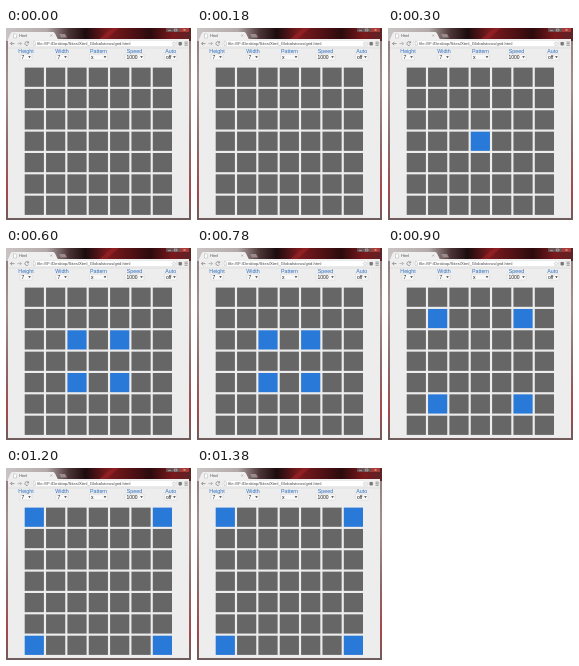
Write an HTML page that moves like this. It is 185 px wide and 192 px high and loops after 1.5 s.

```html
<!DOCTYPE html>
<html lang="en">
<head>
<meta charset="utf-8">
<title>Grid</title>
<style>
  html, body { margin: 0; width: 100%; height: 100%; overflow: hidden; background: #777; }
  svg { display: block; width: 185px; height: 192px; }
  text { font-family: "Liberation Sans", Arial, sans-serif; }
</style>
</head>
<body>
<svg id="stage" viewBox="0 0 185 192" xmlns="http://www.w3.org/2000/svg">
  <defs>
    <linearGradient id="desk" x2="1" y2="0">
      <stop offset="0" stop-color="#c9c4c4"/>
      <stop offset=".22" stop-color="#b5aaaa"/>
      <stop offset=".34" stop-color="#4a3335"/>
      <stop offset=".43" stop-color="#1c0c0e"/>
      <stop offset=".55" stop-color="#7c1a1e"/>
      <stop offset=".7" stop-color="#4a1013"/>
      <stop offset=".78" stop-color="#2c0b0d"/>
      <stop offset=".9" stop-color="#7a181c"/>
      <stop offset="1" stop-color="#5c2426"/>
    </linearGradient>
    <linearGradient id="side" x2="0" y2="1">
      <stop offset="0" stop-color="#8e7a7b"/>
      <stop offset=".3" stop-color="#a78e8e"/>
      <stop offset=".6" stop-color="#8a6a6b"/>
      <stop offset=".85" stop-color="#a5484a"/>
      <stop offset="1" stop-color="#6e5c5c"/>
    </linearGradient>
  </defs>

  <rect width="185" height="192" fill="url(#side)"/>
  <rect width="185" height="13" fill="url(#desk)"/>
  <path d="M92 12L106 0H113L99 12Z" fill="#a8252a" opacity=".5"/>

  <!-- window buttons -->
  <rect x="160" y="0" width="23" height="4" rx="1" fill="#6b5052"/>
  <rect x="174" y="0" width="9" height="4" rx="1" fill="#a93a35"/>
  <path d="M162 2.6H165M168.3 1H171V3H168.3ZM177.5 1L179.5 3M179.5 1L177.5 3" fill="none" stroke="#ddd" stroke-width=".5"/>

  <!-- tab and toolbar -->
  <path d="M2 11.5L4.5 5.5Q5 4 6.5 4H47Q48.5 4 49 5.5L52 11.5Z" fill="#f0efef"/>
  <path d="M53 6H59L61 9.5H55Z" fill="#9a8a8b"/>
  <path d="M7.5 5.8H9.6L10.6 6.8V10H7.5Z" fill="#fff" stroke="#999" stroke-width=".4"/>
  <text x="13" y="9.2" font-size="4" fill="#555">Html</text>
  <path d="M44.3 6.6L46.2 8.5M46.2 6.6L44.3 8.5" stroke="#888" stroke-width=".5"/>
  <rect x="2" y="11" width="181" height="9.2" fill="#efeeee"/>
  <g fill="none" stroke="#888" stroke-width=".8">
    <path d="M8.5 15.6H4.5M6.2 13.9L4.5 15.6L6.2 17.3"/>
    <path d="M11.5 15.6H15.5M13.8 13.9L15.5 15.6L13.8 17.3" stroke="#aaa"/>
    <path d="M22.3 14.4A1.9 1.9 0 1 0 22.5 16.5M22.6 13.3V14.9H21"/>
  </g>
  <rect x="25.5" y="12.6" width="145" height="6" rx="1" fill="#fff" stroke="#d2d2d2" stroke-width=".4"/>
  <path d="M27 13.7H28.7L29.4 14.4V17.3H27Z" fill="#fff" stroke="#888" stroke-width=".4"/>
  <text x="31.2" y="17.1" font-size="4.2" fill="#444">file:///F:/Desktop/Sites/Xtml_Globalstorus/grid.html</text>
  <path d="M168 13.7l.6 1.3 1.4.2-1 1 .2 1.4-1.2-.7-1.2.7.2-1.4-1-1 1.4-.2Z" fill="none" stroke="#aaa" stroke-width=".4"/>
  <rect x="172.5" y="14" width="3.4" height="3.4" rx=".8" fill="#777"/>
  <path d="M178.5 14.1H181.8M178.5 15.7H181.8M178.5 17.3H181.8" stroke="#777" stroke-width=".7"/>

  <!-- page -->
  <rect x="2" y="20" width="181" height="170" fill="#ededed"/>
  <path d="M2 20H183" stroke="#cfcfcf" stroke-width=".5"/>
  <g id="controls"></g>
  <g id="grid"></g>
</svg>
<script>
const SIZE = 7, PITCH = 21.35, CELL = 19.2, LEFT = 18.7, TOP = 39.6;
const STEP = 300, STEPS = 5;
const GRAY = '#666666', BLUE = '#2879d8';

function add(parent, tag, attrs, text) {
  const node = document.createElementNS('http://www.w3.org/2000/svg', tag);
  for (const key in attrs) node.setAttribute(key, attrs[key]);
  if (text) node.textContent = text;
  return parent.appendChild(node);
}

const controls = document.getElementById('controls');
function control(label, value, center, width) {
  const left = center - width / 2;
  add(controls, 'text', { x: center, y: 24.6, 'font-size': 5.3, 'text-anchor': 'middle', fill: '#2d6fc0' }, label);
  add(controls, 'rect', { x: left, y: 26.2, width, height: 5.8, rx: .6, fill: '#f8f8f8', stroke: '#ccc', 'stroke-width': .4 });
  add(controls, 'text', { x: left + 1.5, y: 30.9, 'font-size': 5, fill: '#222' }, value);
  add(controls, 'path', { d: `M${left + width - 3.8} 28.2h2.6l-1.3 1.8Z`, fill: '#333' });
}
control('Height', '7', 20, 12);
control('Width', '7', 56, 12);
control('Pattern', 'x', 92.5, 18);
control('Speed', '1000', 128.5, 19);
control('Auto', 'off', 164.7, 12.5);

const grid = document.getElementById('grid');
const middle = (SIZE - 1) / 2;
const cells = [];
for (let row = 0; row < SIZE; row++) {
  for (let col = 0; col < SIZE; col++) {
    const node = add(grid, 'rect', {
      x: LEFT + col * PITCH, y: TOP + row * PITCH, width: CELL, height: CELL, fill: GRAY
    });
    const dx = Math.abs(col - middle), dy = Math.abs(row - middle);
    cells.push({ node, ring: dx === dy ? dx : -1 });
  }
}

// The lit cells spread from the middle along both diagonals.
function draw(time) {
  const lit = Math.floor(time / STEP) % STEPS - 1;
  for (const { node, ring } of cells) {
    node.setAttribute('fill', ring >= 0 && ring === lit ? BLUE : GRAY);
  }
}

const start = performance.now();
function tick() {
  draw(performance.now() - start);
  requestAnimationFrame(tick);
}
tick();
</script>
</body>
</html>
```
